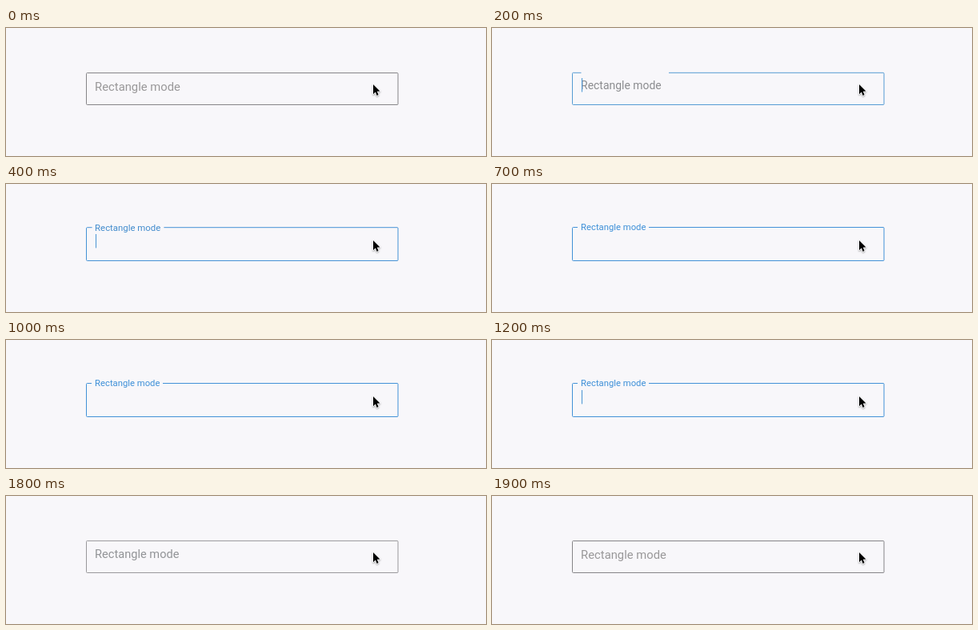
An HTML page with a canvas for the animation above (3000 ms loop, 600x161 px).

```html
<!DOCTYPE html>
<html lang="en">
<head>
<meta charset="utf-8">
<title>Floating label field</title>
<style>
  html, body { margin: 0; width: 100%; height: 100%; overflow: hidden; background: #f8f7fa; }
  canvas { display: block; }
</style>
</head>
<body>
<canvas id="stage" width="600" height="161"></canvas>
<script>
const ctx = document.getElementById('stage').getContext('2d');
const LOOP = 3000, TICK = 100;
const FIELD = { left: 100.5, right: 490, bottom: 96.5 };
const TEXT_X = 111.1;

// Poses hold until the next one: font size, baseline, top edge, notch, colours.
const pose = (at, size, base, top, notch, label, border) =>
  ({ at, size, base, top, notch, label, border });
const REST = [14.8, 79.2, 56.5, null, '#999899', '#858487'];
const poses = [
  pose(0, ...REST),
  pose(200, 13.95, 76.6, 56.3, [111.5, 221], '#8b8c8f', '#559bd3'),
  pose(300, 11.84, 63, 55.4, [108.5, 201], '#4a82b9', '#4893d2'),
  pose(400, 11.4, 59.4, 54.7, [107.6, 197.4], '#428ccd', '#4492d5'),
  pose(500, 11.27, 58.5, 54.5, [107.2, 196.2], '#3f8fd5', '#4191d7'),
  pose(600, 11.27, 58.2, 54.5, [107, 196], '#3e90d8', '#4191d7'),
  pose(1700, 12.97, 69.7, 55.5, [110, 112], '#637f9c', '#b8b7ba'),
  pose(1800, 14.6, 78, 56.4, null, '#929497', '#99989b'),
  pose(1900, ...REST)
];

function drawBorder({ top, notch, border }) {
  const { left, right, bottom } = FIELD, r = 1;
  ctx.strokeStyle = border;
  ctx.lineWidth = 1;
  ctx.beginPath();
  ctx.moveTo(notch ? notch[1] : left + r, top);
  ctx.arcTo(right, top, right, bottom, r);
  ctx.arcTo(right, bottom, left, bottom, r);
  ctx.arcTo(left, bottom, left, top, r);
  ctx.arcTo(left, top, right, top, r);
  if (notch) ctx.lineTo(notch[0], top);
  else ctx.closePath();
  ctx.stroke();
}

function drawLabel({ size, base, label }) {
  ctx.font = `${size}px Roboto, sans-serif`;
  ctx.fillStyle = label;
  ctx.fillText('Rectangle mode', TEXT_X, base);
}

function drawCaret(time) {
  const focused = time >= 200 && time < 1700;
  if (!focused || Math.floor((time - 200) / 500) % 2) return;
  ctx.fillStyle = '#4a94d3';
  ctx.fillRect(112, 63, 1, 17.5);
}

const arrow = new Path2D(
  'M459 71V83.2L461.8 80.6L463.6 84.9L465.6 84L463.8 79.8L467.5 79.6Z');

function drawPointer() {
  ctx.save();
  ctx.shadowColor = 'rgba(0,0,0,.35)';
  ctx.shadowBlur = 2;
  ctx.shadowOffsetY = 1;
  ctx.lineWidth = 1.6;
  ctx.lineJoin = 'round';
  ctx.strokeStyle = '#fff';
  ctx.stroke(arrow);
  ctx.restore();
  ctx.fillStyle = '#000';
  ctx.fill(arrow);
}

function render(now) {
  const time = Math.floor((now % LOOP) / TICK) * TICK;
  const current = poses.filter(p => p.at <= time).pop();
  ctx.fillStyle = '#f8f7fa';
  ctx.fillRect(0, 0, 600, 161);
  drawBorder(current);
  drawLabel(current);
  drawCaret(time);
  drawPointer();
}

const start = performance.now();
function loop() {
  render(performance.now() - start);
  requestAnimationFrame(loop);
}
loop();
</script>
</body>
</html>
```
